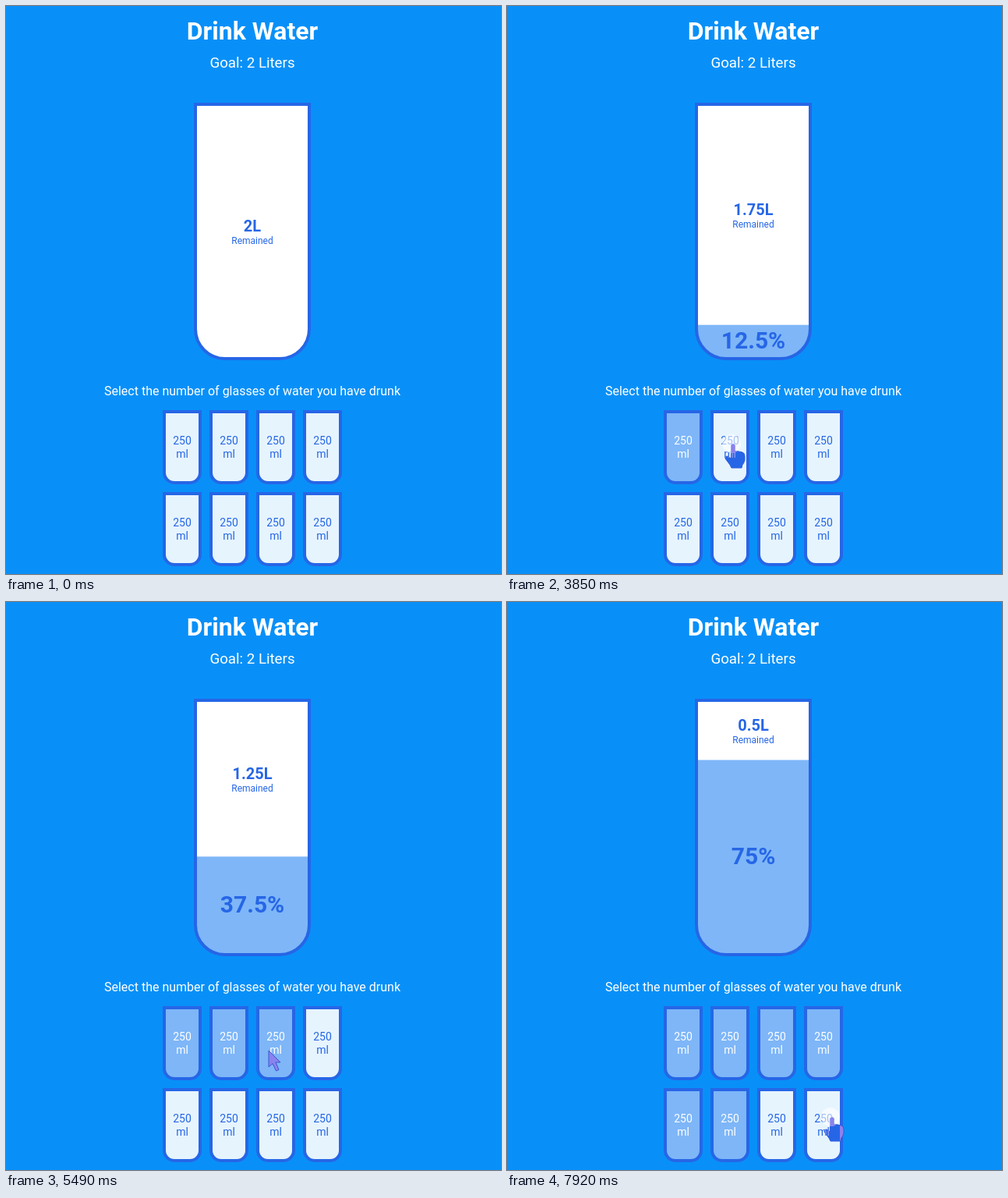
An HTML page that plays this animation: 635x728 px, repeating every 8000 ms.

```html
<!DOCTYPE html>
<html lang="en">
<head>
<meta charset="utf-8">
<title>Drink Water</title>
<style>
  :root { --blue: #2666e6; --pale: #e6f4fe; --water: #7eb6f8; --lilac: #8b82ee; }
  html, body { margin: 0; width: 100%; height: 100%; overflow: hidden; background: #0890f8; }
  svg { display: block; width: 635px; height: 728px; font-family: Roboto, sans-serif; text-anchor: middle; }
  .bold { font-weight: 700; }
  .white { fill: #fff; }
  .blue { fill: var(--blue); }
  .rim { stroke: var(--blue); stroke-width: 4; }
  .label { font-size: 14px; }
  .echo { fill: #979cf2; }
</style>
</head>
<body>
<svg viewBox="0 0 635 728">
  <defs>
    <clipPath id="inGlass"><path id="glassShape"/></clipPath>
    <clipPath id="inPale"></clipPath>
    <clipPath id="inRipple"><circle class="ring" r="12"/></clipPath>
    <clipPath id="inPointer"><path class="pointer"/></clipPath>
  </defs>

  <text class="white bold" x="316" y="43" font-size="32">Drink Water</text>
  <text class="white" x="316" y="79" font-size="18.72">Goal: 2 Liters</text>

  <path class="white" id="glassBack"/>
  <g clip-path="url(#inGlass)">
    <rect id="water" x="243" width="146" fill="#7eb6f8"/>
    <text class="blue bold" id="liters" x="316" font-size="20"></text>
    <text class="blue" id="remained" x="316" font-size="12">Remained</text>
    <text class="blue bold" id="percent" x="316" font-size="30"></text>
  </g>
  <path class="rim" id="glassRim" fill="none"/>

  <text class="white" x="316" y="499" font-size="16">Select the number of glasses of water you have drunk</text>
  <g id="cups"></g>

  <g id="cursor">
    <path class="pointer" fill="#8b82ee" stroke="#3c55cf" stroke-width="1"/>
    <g clip-path="url(#inPale)"><path class="pointer blue"/></g>
    <g id="echoes" clip-path="url(#inPointer)"></g>
    <g id="ripple">
      <circle class="ring" r="12" fill="#fff" fill-opacity=".6"/>
      <g clip-path="url(#inRipple)"><path class="pointer" fill="#8b82ee"/></g>
    </g>
  </g>
</svg>

<script>
const LOOP = 8000, SIZE = 330, BOTTOM = 450, TOP = 128;
const ARROW = 'M0 0V21L5 16.5L9.5 26L13 24.5L9 15H15Z';
const HAND = 'M-2.5 2Q0 -1.5 2.5 2V9L12 11Q15 12 15 16V21Q14 25 12 27L11 31H-2L-4 27L-10 19Q-10 15.5 -7 16L-2.5 19Z';

// Screen updates: [from, to, count], evenly spaced
const RUNS = [[1000, 2020, 6], [2220, 2620, 3], [3030, 4050, 6], [4270, 5270, 6],
              [5490, 6480, 6], [6700, 7700, 6], [7920, 7920, 1]];
const ticks = [0];
for (const [from, to, count] of RUNS)
  for (let i = 0; i < count; i++)
    ticks.push(count > 1 ? Math.round((from + (to - from) * i / (count - 1)) / 10) * 10 : from);

// Clicks: [time, glasses drunk afterwards]
const CLICKS = [[2225, 1], [3935, 2], [5204, 3], [6590, 6]];
const PRESSES = [2220, 3850, 6480, 7920];
// Pointer: [time, x, y]
const ROUTE = [[1000, 510, 656], [2020, 233, 557], [2820, 233, 557], [3640, 288, 560],
               [3850, 290, 561], [4050, 289, 561], [5070, 345, 563], [5270, 345, 563],
               [6280, 281, 658], [6480, 283, 658], [6700, 281, 660], [6900, 281, 660],
               [7700, 412, 660], [7920, 417, 660]];

const $ = id => document.getElementById(id);
const all = sel => [...document.querySelectorAll(sel)];
const set = (el, attrs) => { for (const k in attrs) el.setAttribute(k, attrs[k]); return el; };
const add = (parent, tag, attrs, text = '') => {
  const el = set(document.createElementNS('http://www.w3.org/2000/svg', tag), attrs);
  el.textContent = text;
  return parent.appendChild(el);
};
const show = (el, on) => { el.style.display = on ? '' : 'none'; };
const mix = (a, b, p) => `color-mix(in srgb, ${b} ${p * 100}%, ${a})`;

// Box with round lower corners
const tumbler = (x, y, w, h, r) =>
  `M${x} ${y}h${w}v${h - r}a${r} ${r} 0 0 1 ${-r} ${r}h${2 * r - w}a${r} ${r} 0 0 1 ${-r} ${-r}Z`;

// CSS "ease" curve
function ease(x) {
  if (x <= 0) return 0;
  if (x >= 1) return 1;
  const bez = (a, b, s) => 3 * a * s * (1 - s) ** 2 + 3 * b * s * s * (1 - s) + s ** 3;
  let lo = 0, hi = 1;
  for (let i = 0; i < 24; i++) {
    const mid = (lo + hi) / 2;
    if (bez(.25, .25, mid) < x) lo = mid; else hi = mid;
  }
  return bez(.1, 1, lo);
}

for (const id of ['glassShape', 'glassBack', 'glassRim'])
  set($(id), { d: tumbler(243, 126, 146, 326, 38) });

const cups = Array.from({ length: 8 }, (_, i) => {
  const x = 201 + i % 4 * 60, y = 518 + Math.floor(i / 4) * 105;
  const label = (parent, cls) => {
    const g = add(parent, 'g', { class: cls });
    add(g, 'text', { x: x + 25, y: y + 44 }, '250');
    add(g, 'text', { x: x + 25, y: y + 61 }, 'ml');
    return g;
  };
  return {
    body: add($('cups'), 'path', { class: 'rim', d: tumbler(x + 2, y + 2, 46, 91, 13) }),
    text: label($('cups'), 'label'),
    echo: label($('echoes'), 'label echo'),
    mask: add($('inPale'), 'path', { d: tumbler(x + 4, y + 4, 42, 87, 11) })
  };
});

function pointerAt(t) {
  let i = 0;
  while (i < ROUTE.length - 2 && t >= ROUTE[i + 1][0]) i++;
  const [t0, x0, y0] = ROUTE[i], [t1, x1, y1] = ROUTE[i + 1];
  const u = Math.min(1, Math.max(0, (t - t0) / (t1 - t0)));
  const s = u * u * (3 - 2 * u);
  return [x0 + (x1 - x0) * s, y0 + (y1 - y0) * s].map(Math.round);
}

function draw(t) {
  let before = 0, drunk = 0, p = 1;
  for (const [at, n] of CLICKS) if (t >= at) {
    before = drunk;
    drunk = n;
    p = ease((t - at) / 300);
  }

  const height = SIZE * (before + (drunk - before) * p) / 8;
  const level = BOTTOM - height;
  const base = Math.round((TOP + level) / 2);
  set($('water'), { y: level, height: height + 4 });
  set($('liters'), { y: base }).textContent = 2 - drunk / 4 + 'L';
  set($('remained'), { y: base + 16 });
  set($('percent'), { y: Math.round((level + BOTTOM) / 2 + 10) }).textContent = drunk * 12.5 + '%';
  show($('percent'), drunk);

  cups.forEach((cup, i) => {
    const full = i < before ? 1 : i < drunk ? p : 0;
    cup.body.style.fill = mix('var(--pale)', 'var(--water)', full);
    cup.text.style.fill = mix('var(--blue)', '#fff', full);
    show(cup.mask, !full);
    show(cup.echo, !full);
  });

  const pressed = PRESSES.includes(t);
  const [x, y] = pointerAt(t);
  show($('cursor'), t >= 1000);
  show($('ripple'), pressed);
  all('.pointer').forEach(el => set(el, { d: pressed ? HAND : ARROW, transform: `translate(${x} ${y})` }));
  all('.ring').forEach(el => set(el, { cx: x - 2, cy: y }));
}

let shown = -1;
function loop() {
  const now = performance.now() % LOOP;
  const t = ticks.filter(v => v <= now).pop();
  if (t !== shown) draw(shown = t);
  requestAnimationFrame(loop);
}
loop();
</script>
</body>
</html>
```
